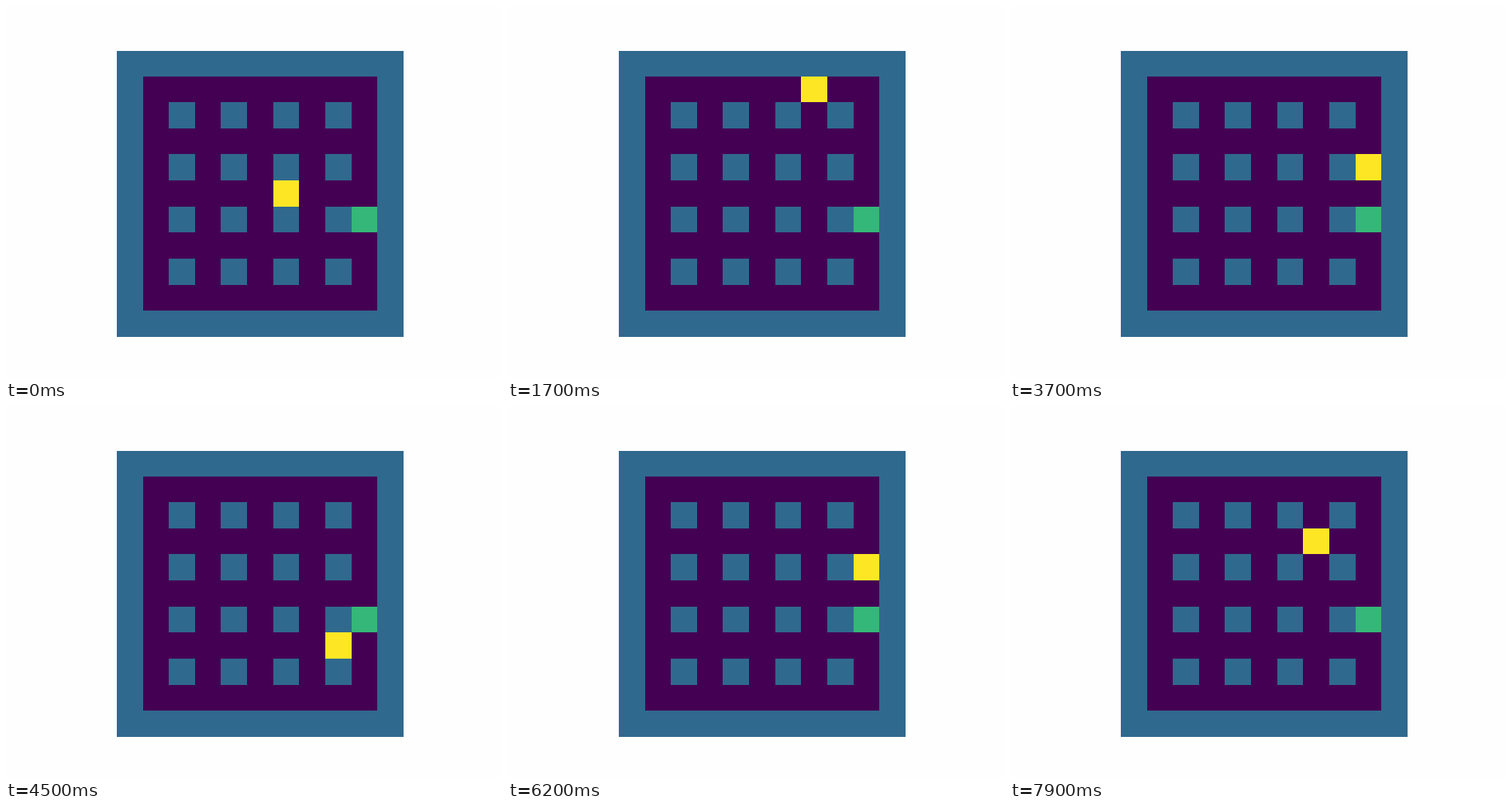
Animation of 640x480 px, one loop 8000 ms. Source, as an HTML page with a canvas:

```html
<!DOCTYPE html>
<html lang="en">
<head>
<meta charset="utf-8">
<title>Grid walker</title>
<style>
html, body { margin: 0; width: 100%; height: 100%; overflow: hidden; background: #fefefe; }
canvas { display: block; }
</style>
</head>
<body>
<canvas id="stage" width="640" height="480"></canvas>
<script>
const ctx = document.getElementById('stage').getContext('2d');
const STEP = 100, LOOP = 8000;
const BACK = '#fefefe', WALL = '#30698e', FLOOR = '#440154', GOAL = '#35b779', AGENT = '#fde725';
const LEFT = 143, TOP = 57, SIDE = 370, CELLS = 11;

const goal = [9, 6];
// Where each walk begins; the rest of its route follows from the rule below
const starts = [
  [6, 5], [5, 5], [9, 1], [4, 1], [7, 2], [3, 3], [7, 3], [7, 7],
  [8, 9], [6, 3], [7, 3], [9, 4], [8, 1], [4, 3], [7, 2]
];

const isPillar = (c, r) => c % 2 === 0 && r % 2 === 0;

// Each walk heads right where it can, otherwise up or down, and
// restarts elsewhere as soon as it would enter the goal.
function* walk() {
  for (let [c, r] of starts) {
    while (c !== goal[0] || r !== goal[1]) {
      yield [c, r];
      if (c < goal[0] && !isPillar(c + 1, r)) c++;
      else r += Math.sign(goal[1] - r);
    }
  }
}

// Cell borders snapped to whole pixels
const edge = k => Math.round(k * SIDE / CELLS - 0.1);

function fillCells(color, c, r, size = 1) {
  ctx.fillStyle = color;
  ctx.fillRect(LEFT + edge(c), TOP + edge(r), edge(c + size) - edge(c), edge(r + size) - edge(r));
}

const path = [...walk()];

function draw(time) {
  ctx.fillStyle = BACK;
  ctx.fillRect(0, 0, 640, 480);
  ctx.fillStyle = WALL;
  ctx.fillRect(LEFT, TOP + 1, SIDE, SIDE - 1);
  fillCells(FLOOR, 1, 1, 9);
  for (let r = 2; r < 10; r += 2) {
    for (let c = 2; c < 10; c += 2) fillCells(WALL, c, r);
  }
  fillCells(GOAL, ...goal);
  fillCells(AGENT, ...path[Math.floor((time % LOOP) / STEP)]);
}

let origin = null;
function tick(now) {
  if (origin === null) origin = now;
  draw(Math.max(0, now - origin));
  requestAnimationFrame(tick);
}
draw(0);
requestAnimationFrame(tick);
</script>
</body>
</html>
```
